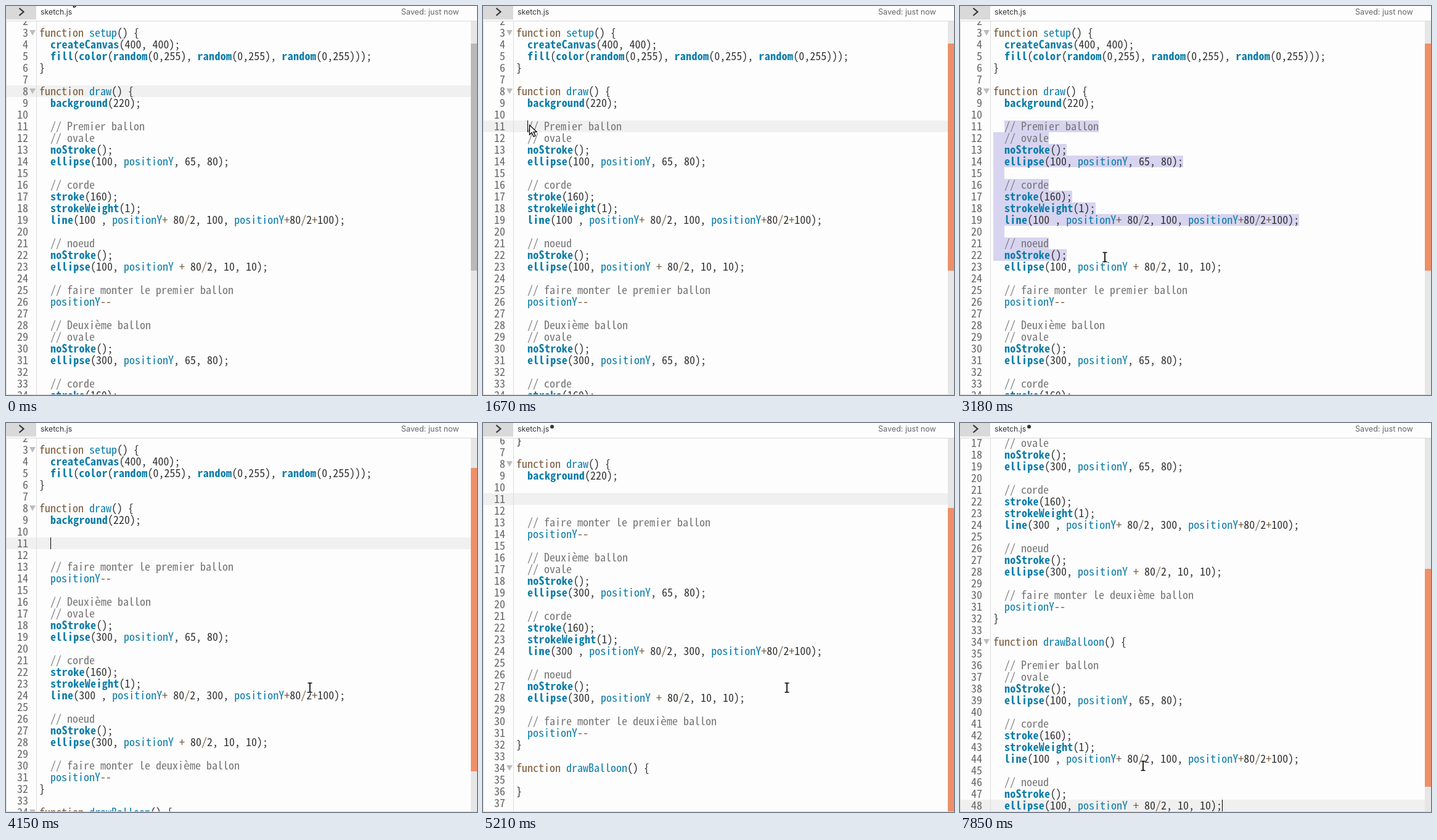
These frames come from a looping animation (764 px wide and 632 px high, 8 s). An HTML page:

```html
<!DOCTYPE html>
<html lang="fr">
<head>
<meta charset="utf-8">
<title>sketch.js</title>
<style>
html, body { margin: 0; width: 100%; height: 100%; overflow: hidden; background: #fdfdfd; }
#stage { position: relative; width: 764px; height: 632px; overflow: hidden; background: #fdfdfd; color: #333; }
#stage div, #stage svg { position: absolute; }
.head { top: 0; line-height: 20px; white-space: pre; font-family: Inter, "Open Sans", sans-serif; }
#toggle { left: 0; top: 0; width: 49px; height: 22px; background: #d9d9d9; }
#dirty { left: 109px; top: 3px; width: 6px; height: 6px; border-radius: 50%; background: #333; }
#editor { left: 0; top: 24px; width: 764px; height: 608px; box-sizing: border-box; border: 1px solid #d9d9d9; border-right: 0; overflow: hidden; }
#page { left: -1px; top: -25px; width: 764px; }
#gutter { left: 48px; top: 0; width: 1px; height: 606px; background: #ddd; }
#bar { right: 0; top: 0; width: 10px; height: 606px; background: #e6e6e6; }
#thumb { width: 10px; }
#active { left: 1px; width: 753px; height: 19px; background: #f0f0f0; }
#caret { width: 1px; height: 19px; background: #000; }
#marks div { height: 19px; background: #d7d4f0; }
#rows { font-family: "Noto Sans Mono CJK JP", "Noto Sans Mono", "DejaVu Sans Mono", monospace; line-height: 19px; white-space: pre; }
.row { left: 0; height: 19px; width: 754px; }
.num, .code { top: var(--drop); }
.num { left: 0; width: 36px; text-align: right; color: #666; }
.code { left: 54px; }
.fold { left: 38px; top: 5px; width: 10px; height: 9px; background: #bdbdbd; clip-path: polygon(0 0, 100% 0, 50% 100%); }
.fn { color: #0b7ca9; font-weight: 700; letter-spacing: .3px; }
.var { color: #0b7ca9; }
.key, .op { color: #7a5a3a; }
.com { color: #757575; }
.match { display: inline-block; height: 19px; outline: 1px solid #999; outline-offset: 1px; }
svg { overflow: visible; }
</style>
</head>
<body>
<div id="stage">
  <div id="toggle"></div>
  <svg width="1" height="1"><path d="M21.5 3.5 28.5 9.5 21.5 15.5" fill="none" stroke="#333" stroke-width="2.2"/></svg>
  <div class="head" style="left:56px;font-size:12.3px">sketch.js</div>
  <div id="dirty"></div>
  <div class="head" style="left:641px;font-size:12.6px;color:#666">Saved: just now</div>
  <div id="editor">
    <div id="page">
      <div id="active"></div>
      <div id="marks"></div>
      <div id="rows"></div>
      <div id="caret"></div>
    </div>
    <div id="gutter"></div>
    <div id="bar"><div id="thumb"></div></div>
  </div>
  <svg id="arrow" width="1" height="1">
    <path d="M.5 .5V16l3.7-3.4 2.8 6.6 2.9-1.2-2.8-6.4h5z" fill="#fff" stroke="#000" stroke-width="1.3"/>
  </svg>
  <svg id="beam" width="1" height="1" fill="none">
    <path d="M-3.5-7.5H3.5M0-7.5V7.5M-3.5 7.5H3.5" stroke="#fff" stroke-width="3.6"/>
    <path d="M-3.5-7.5H3.5M0-7.5V7.5M-3.5 7.5H3.5" stroke="#000" stroke-width="1.7"/>
  </svg>
</div>
<script>
const LOOP = 8000, ROW = 19, CHAR = 9, LEFT = 54, BOLD_EXTRA = .3, BASELINE = 16;
const $ = id => document.getElementById(id);
const rowTop = n => n * ROW - 23;

const indent = s => '  ' + s;
const balloon = (name, x) => [
  `// ${name} ballon`, '// ovale', 'noStroke();', `ellipse(${x}, positionY, 65, 80);`, '',
  '// corde', 'stroke(160);', 'strokeWeight(1);', `line(${x} , positionY+ 80/2, ${x}, positionY+80/2+100);`, '',
  '// noeud', 'noStroke();', `ellipse(${x}, positionY + 80/2, 10, 10);`
].map(indent);
const rise = name => ['', `// faire monter le ${name} ballon`, 'positionY--'].map(indent);
const first = balloon('Premier', 100), blank = indent('');
const sketch = (inDraw, inBalloon) => [
  'let positionY = 300;', '',
  'function setup() {', '  createCanvas(400, 400);',
  '  fill(color(random(0,255), random(0,255), random(0,255)));', '}', '',
  'function draw() {', '  background(220);', blank,
  ...inDraw, ...rise('premier'), blank,
  ...balloon('Deuxième', 300), ...rise('deuxième'), '}', '',
  'function drawBalloon() {', ...inBalloon, '}', ''
];

const before = sketch(first, ['']), cut = sketch([blank], ['']);
const scenes = [
  { at: 0, lines: before, line: 8 },
  { at: 1670, lines: before, line: 11 },
  { at: 4150, lines: cut, line: 11 },
  { at: 6330, lines: cut, line: 34, matching: true },
  { at: 7240, lines: sketch([blank], [blank, '']), line: 35 },
  { at: 7450, lines: sketch([blank], ['', blank, '']), line: 36 },
  { at: 7850, lines: sketch([blank], ['', ...first, '']), line: 48 }
];
const moves = [
  { from: 60, to: 730, x: 75, y: 193, bend: 22 },
  { from: 1880, to: 2670, x: 222, y: 367 },
  { from: 2760, to: 3180, x: 235, y: 408 },
  { from: 3570, to: 3700, x: 493, y: 430 },
  { from: 5470, to: 5610, x: 440, y: 481 },
  { from: 5870, to: 6090, x: 297, y: 557 }
];

const clamp = v => Math.min(1, Math.max(0, v));
const progress = (t, from, to) => clamp((t - from) / (to - from));
const within = (t, from, to) => t >= from && t < to;

function pointer(t) {
  let x = 103, y = -17;
  for (const m of moves) {
    const p = progress(t, m.from, m.to), ease = p * p * (3 - 2 * p);
    x += (m.x - x) * ease + (m.bend || 0) * Math.sin(Math.PI * ease);
    y += (m.y - y) * ease;
  }
  return [x, y];
}

// The wheel slows to a stop; the paste then jumps to the new end.
function scrollAt(t) {
  const rest = 1 - progress(t, 4755, 5210);
  return t >= 7850 ? 277 : Math.round(72 * (1 - rest * rest));
}

const token = /(\/\/.*)|(function)|((?<=function )\w+|[a-z]\w*(?!\w|\())|([a-z]\w*(?=\())|([-+\/]+)/gi;
const kinds = ['com', 'key', 'var', 'fn', 'op'];
const paint = s => s.replace(token, (m, ...g) => `<span class="${kinds[g.findIndex((x, i) => i < 5 && x)]}">${m}</span>`);

// Bold call names run slightly wider than plain text.
function columnX(s, col) {
  const calls = s.startsWith('function') ? [] : s.slice(0, col).match(/[a-z]\w*(?=\()/gi) || [];
  return LEFT + col * CHAR + calls.join('').length * BOLD_EXTRA;
}

function rowHtml(s, i, matched) {
  let code = paint(s);
  if (matched) code = code.replace(/[{}]/, '<span class="match">$&</span>');
  const fold = s.endsWith('{') ? '<div class="fold"></div>' : '';
  return `<div class="row" style="top:${rowTop(i + 1)}px"><div class="num">${i + 1}</div>${fold}<div class="code">${code}</div></div>`;
}

function selection(lines, x, y) {
  const last = Math.max(11, Math.floor((y - rowTop(0)) / ROW));
  let html = '';
  for (let n = 11; n <= last; n++) {
    const s = lines[n - 1];
    const from = columnX(s, n === 11 ? 2 : 0);
    const end = n === last ? Math.min(s.length, Math.round((x - LEFT) / CHAR)) : s.length;
    const width = Math.max(0, Math.round(columnX(s, end) - from));
    html += `<div style="left:${from}px;top:${rowTop(n)}px;width:${width}px"></div>`;
  }
  return html;
}

// Size the code font to the column width and seat it on the baseline.
function fitFont() {
  const rows = $('rows'), ctx = document.createElement('canvas').getContext('2d');
  const measure = size => {
    ctx.font = `${size}px ${getComputedStyle(rows).fontFamily}`;
    return ctx.measureText('m');
  };
  const size = CHAR * 100 / measure(100).width;
  const m = measure(size);
  const natural = (ROW + m.fontBoundingBoxAscent - m.fontBoundingBoxDescent) / 2;
  rows.style.fontSize = size + 'px';
  rows.style.setProperty('--drop', Math.round(BASELINE - natural) + 'px');
}

const show = (el, on) => { el.style.visibility = on ? 'visible' : 'hidden'; };
const move = (el, x, y) => { el.style.transform = `translate(${x}px,${y}px)`; };
let drawn;

function draw(now) {
  const t = now % LOOP;
  const scene = scenes.findLast(s => s.at <= t);
  const { lines, line, matching } = scene;
  const scroll = scrollAt(t), [x, y] = pointer(t);
  const selecting = within(t, 1880, 4150);

  if (scene !== drawn) {
    const isPair = i => i === line - 1 || i === line + 1;
    $('rows').innerHTML = lines.map((s, i) => rowHtml(s, i, matching && isPair(i))).join('');
    drawn = scene;
  }
  move($('page'), 0, -scroll);
  move($('active'), 0, rowTop(line));
  show($('active'), !selecting);
  const text = lines[line - 1], col = t < 4150 ? 2 : text.length;
  move($('caret'), Math.round(columnX(text, col)), rowTop(line));
  show($('caret'), t >= 1670 && !selecting && !within(t, 5210, 6270));
  $('marks').innerHTML = selecting ? selection(lines, x, y) : '';

  const size = 17600 / (lines.length - 1.3);
  $('thumb').style.height = Math.round(size) + 'px';
  $('thumb').style.background = t < 1670 ? '#b9b9b9' : '#ee8f68';
  move($('thumb'), 0, Math.round((54 + scroll) * size * .001812));

  show($('dirty'), t >= 5000);
  const arrow = t < 1880;
  show($('arrow'), arrow);
  show($('beam'), !arrow);
  move($(arrow ? 'arrow' : 'beam'), Math.round(x), Math.round(y));
  requestAnimationFrame(draw);
}
fitFont();
draw(0);
</script>
</body>
</html>
```
